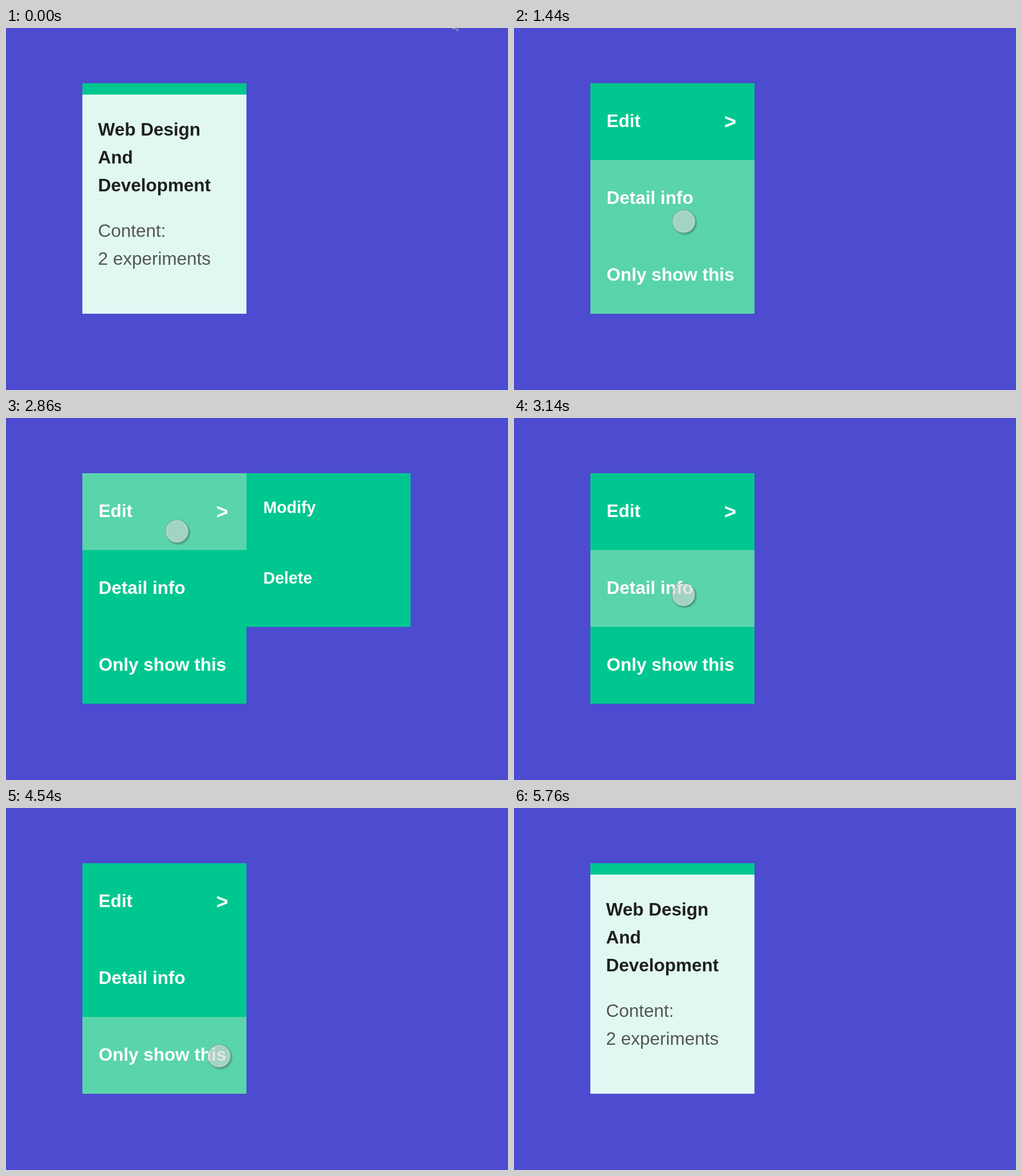
These frames come from a looping animation (881x636 px, 7.44 s). An HTML page:

```html
<!DOCTYPE html>
<html lang="en">
<head>
<meta charset="utf-8">
<title>Card menu</title>
<style>
  :root { --green: #00c78f; --loop: 7440ms linear infinite; }
  html, body { margin: 0; width: 100%; height: 100%; overflow: hidden; background: #4d4bd0; }
  .stage { position: relative; width: 881px; height: 636px; overflow: hidden; }
  .stage div, svg { position: absolute; }
  svg { left: 0; top: 0; font: 31.5px "Liberation Sans", Arial, sans-serif; }
  .bold { font-weight: 700; }

  .card { left: 134px; top: 97px; width: 288px; height: 405px; background: #e1f8f2; }
  .sheet { left: 134px; top: 97px; width: 288px; height: 19.5px; overflow: hidden;
    background: var(--green); animation: sheet var(--loop); }
  .item { left: 0; width: 288px; height: 135px; background: #5ad4ab; opacity: 0; }
  .edit { top: 0; animation: edit var(--loop); }
  .detail { top: 135px; animation: detail var(--loop); }
  .only { top: 270px; animation: only var(--loop); }
  .labels { fill: #fff; animation: labels var(--loop); animation-timing-function: step-end; }
  .submenu { animation: submenu var(--loop); animation-timing-function: step-end; }
  .submenu text { font-size: 28.6px; }

  .arrow { animation: arrow var(--loop); animation-timing-function: step-end; }
  .disc { left: -20.5px; top: -20.5px; width: 41px; height: 41px; box-sizing: border-box;
    border-radius: 50%; background: rgba(210, 210, 213, .6);
    border: 1px solid rgba(40, 60, 60, .4);
    box-shadow: inset 0 0 0 1.5px rgba(255, 255, 255, .35), 2px 2px 3px rgba(0, 0, 0, .3);
    animation: path var(--loop), shown var(--loop);
    animation-timing-function: ease-in-out, step-end; }

  @keyframes sheet {
    0% { height: 19.5px; }
    7.003% { height: 19.5px; animation-timing-function: ease; }
    10.363%, 62.298% { height: 405px; animation-timing-function: ease; }
    65.659%, 100% { height: 19.5px; }
  }
  @keyframes labels { 0% { opacity: 0; } 7.003% { opacity: 1; } 62.298%, 100% { opacity: 0; } }
  @keyframes submenu { 0% { opacity: 0; } 28.226% { opacity: 1; } 39.919%, 100% { opacity: 0; } }
  @keyframes edit {
    0%, 28.226%, 42.204%, 100% { opacity: 0; }
    30.376%, 39.919% { opacity: 1; }
  }
  @keyframes detail {
    0%, 16.935%, 30.376%, 39.919%, 51.613%, 100% { opacity: 0; }
    19.355%, 28.226%, 42.204%, 48.925% { opacity: 1; }
  }
  @keyframes only {
    0%, 7.527%, 21.505%, 49.597%, 65.659%, 100% { opacity: 0; }
    11.559%, 19.355%, 53.495%, 62.298% { opacity: 1; }
  }
  @keyframes arrow { 0% { opacity: 1; } .269%, 100% { opacity: 0; } }
  @keyframes shown { 0% { opacity: 0; } .269% { opacity: 1; } 77.419%, 100% { opacity: 0; } }
  @keyframes path {
    0%, .269% { transform: translate(783px, 0); animation-timing-function: cubic-bezier(.5, 0, .8, .8); }
    7.003% { transform: translate(415px, 400px); animation-timing-function: linear; }
    7.796% { transform: translate(345.5px, 452px); animation-timing-function: ease-out; }
    10.215%, 13.441% { transform: translate(312px, 458px); }
    19.355%, 24.731% { transform: translate(297.5px, 339.5px); }
    30.376%, 38.441% { transform: translate(299.5px, 198.5px); }
    42.204%, 46.237% { transform: translate(297px, 310px); }
    51.882% { transform: translate(278px, 438px); }
    56.989% { transform: translate(278px, 438px); animation-timing-function: cubic-bezier(.4, 0, .8, .8); }
    62.298% { transform: translate(418px, 434px); animation-timing-function: linear; }
    65.054% { transform: translate(493.5px, 432.5px); animation-timing-function: linear; }
    66.935% { transform: translate(568px, 435px); animation-timing-function: linear; }
    72.312% { transform: translate(730px, 451px); animation-timing-function: linear; }
    77.151%, 100% { transform: translate(888px, 441px); }
  }
</style>
</head>
<body>
<div class="stage">
  <div class="card"></div>
  <svg width="881" height="636">
    <g class="bold" fill="#1f1f1f">
      <text x="161.5" y="189">Web Design</text>
      <text x="161.5" y="238">And</text>
      <text x="161.5" y="287">Development</text>
    </g>
    <g fill="#555">
      <text x="161.5" y="367">Content:</text>
      <text x="161.5" y="416">2 experiments</text>
    </g>
  </svg>

  <div class="sheet">
    <div class="item edit"></div>
    <div class="item detail"></div>
    <div class="item only"></div>
  </div>

  <svg class="bold" width="881" height="636">
    <g class="labels">
      <text x="162.5" y="174">Edit</text>
      <text x="369" y="177" font-size="36">&gt;</text>
      <text x="162.5" y="309">Detail info</text>
      <text x="162.5" y="444">Only show this</text>
    </g>
    <g class="submenu" fill="#fff">
      <path fill="#00c78f" d="M422 97h288v270h-288z"/>
      <text x="451.5" y="167">Modify</text>
      <text x="451.5" y="290.5">Delete</text>
    </g>
    <path class="arrow" transform="translate(784.5 -14)" fill="#111" stroke="#fff"
      d="M0 0V16L4 12.5 6.5 18.5 9 17.5 6.5 11.5H11.5Z"/>
  </svg>

  <div class="disc"></div>
</div>
</body>
</html>
```
